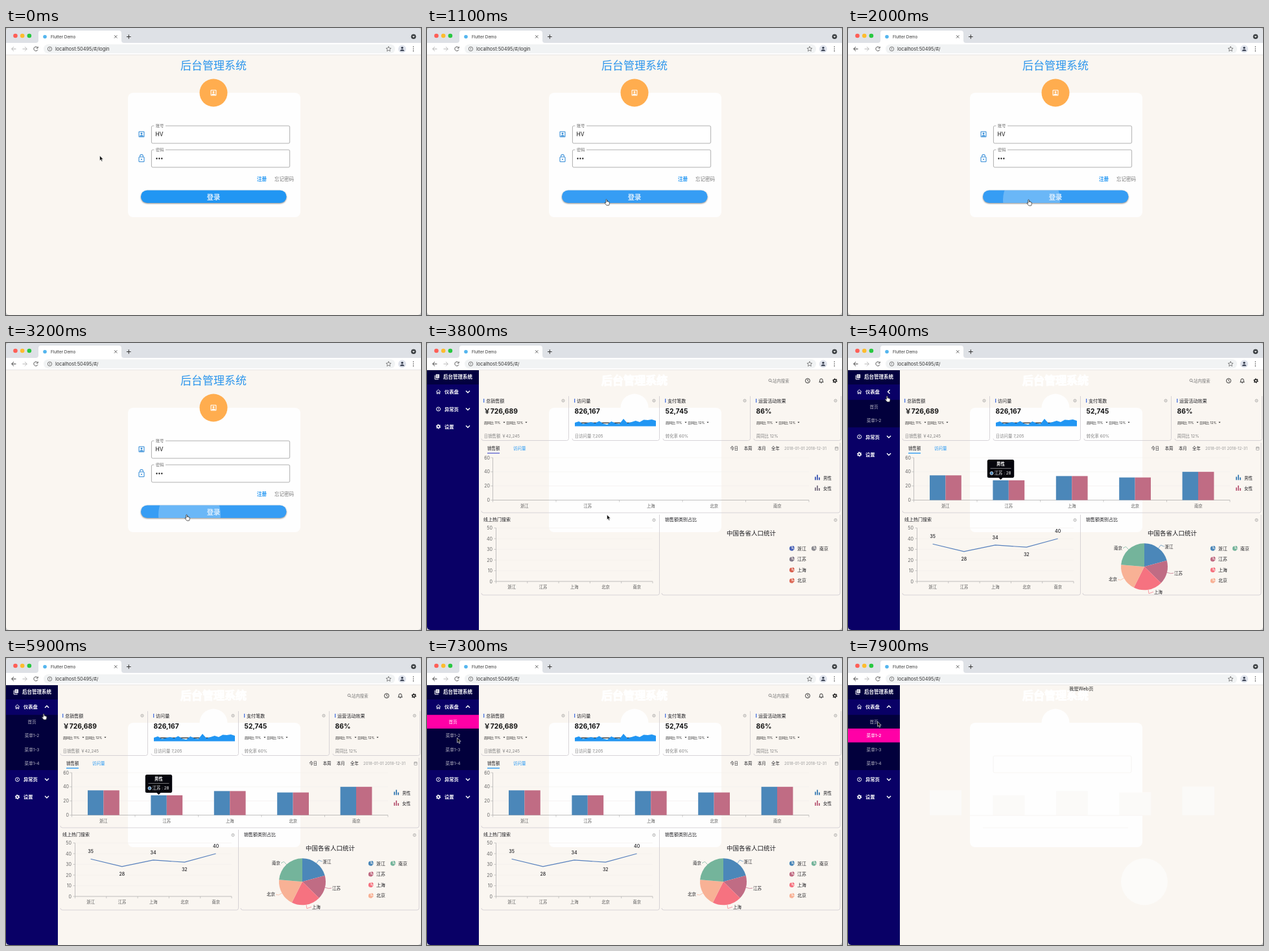
An HTML page for the animation above (8000 ms loop, 640x443 px).

```html
<!DOCTYPE html>
<html lang="zh-CN">
<head>
<meta charset="utf-8">
<title>后台管理系统</title>
<style>
html, body { margin: 0; width: 100%; height: 100%; overflow: hidden; background: #c8c8c8; }
svg { display: block; width: 640px; height: 443px; border-radius: 5px; font-family: Inter, "Noto Sans CJK SC", "Noto Sans CJK", sans-serif; }
text { white-space: pre; }
</style>
</head>
<body>
<svg id="stage" viewBox="0 0 640 443"></svg>
<script>
const BG = '#faf6f1', BLUE = '#2196f3', GRAY = '#808080', DARK = '#1c1c20';
const CITIES = ['浙江', '江苏', '上海', '北京', '南京'];
const VALUES = [35, 28, 34, 32, 40];
const COLORS = ['#4b87b9', '#c06c84', '#f67280', '#f8b195', '#74b49b'];
const EARLY = ['#4a63b8', '#857c8c', '#d9604f', '#dd6a58', '#8a8a90'];

// Drawing helpers
const rect = (x, y, w, h, fill, rx = 0, more = '') =>
  `<rect x="${x}" y="${y}" width="${w}" height="${h}" fill="${fill}" rx="${rx}" ${more}/>`;
const circle = (x, y, r, fill, more = '') => `<circle cx="${x}" cy="${y}" r="${r}" fill="${fill}" ${more}/>`;
const line = (d, color, w = .8, fill = 'none') =>
  `<path d="${d}" stroke="${color}" stroke-width="${w}" fill="${fill}"/>`;
const shape = (d, fill, more = '') => `<path d="${d}" fill="${fill}" ${more}/>`;
const text = (x, y, s, size, fill = DARK, weight = 400, anchor = 'start', more = '') =>
  `<text x="${x}" y="${y}" font-size="${size}" fill="${fill}" font-weight="${weight}" text-anchor="${anchor}" ${more}>${s}</text>`;
const at = (x, y, body, more = '') => `<g transform="translate(${x} ${y}) ${more}">${body}</g>`;
const clip = (id, area, body) => `<clipPath id="${id}">${area}</clipPath><g clip-path="url(#${id})">${body}</g>`;

const part = (t, from, to) => Math.min(1, Math.max(0, (t - from) / (to - from)));
const easeOut = p => 1 - (1 - p) ** 3;

// Icons, centred on 0,0
const info = (x, y, r = 2.1, c = '#888', w = .6) =>
  at(x, y, circle(0, 0, r, 'none', `stroke="${c}" stroke-width="${w}"`) + line(`M0 ${-r * .5}V${r * .15}M0 ${r * .4}v${r * .2}`, c, w));
const gear = (x, y, c, hole) => at(x, y,
  circle(0, 0, 2.7, c) + circle(0, 0, 3, 'none', `stroke="${c}" stroke-width="1.4" stroke-dasharray="1.57 1.57"`) + circle(0, 0, 1.2, hole));
const person = (x, y, c, back) => at(x, y,
  rect(-4.5, -4.5, 9, 9, c, 1) + rect(-3.4, -3.4, 6.8, 6.8, back) + circle(0, -1.1, 1.5, c) + shape('M-3 3.4C-3 .6 3 .6 3 3.4Z', c));
const chevron = (x, y, p = 0) => at(x, y, line('M-3-1.5L0 1.5 3-1.5', '#fff', 1.4), `rotate(${p * 180})`);
const bars = (x, y, c) => at(x, y, shape('M-4 4V-1h2V4ZM-1 4V-4h2V4ZM2 4V0h2V4Z', c));
const pieIcon = (x, y, c) => at(x, y, shape('M-.4-3.4A3.6 3.6 0 1 0 3 1L-.4.4ZM.6-4A3.6 3.6 0 0 1 3.8-.6L.6-.4ZM.8.2H3.8A3 3 0 0 1 3 2Z', c));

function browser(home) {
  return rect(0, 0, 640, 23, '#dee1e6')
    + ['#ff5f57', '#febc2e', '#28c840'].map((c, i) => circle(14.5 + 10.7 * i, 12, 3.3, c)).join('')
    + shape('M46 23q4 0 4-4V8q0-4 4-4H174q4 0 4 4V19q0 4 4 4Z', '#fff')
    + circle(60, 13.5, 2.8, '#54b5ee')
    + text(69, 16, 'Flutter Demo', 6.3, '#333')
    + line('M167 11.2l4.4 4.4m0-4.4l-4.4 4.4', '#555', .9)
    + line('M186 13.5h6.6M189.3 10.2v6.6', '#333', 1)
    + circle(628.5, 13.3, 3.8, '#3c4043') + shape('M626.5 12.4h4l-2 2.4Z', '#fff')
    + rect(0, 23, 640, 19, '#fff') + rect(58, 25.3, 542, 14, '#f1f3f4', 7)
    + line('M15.5 32.3H8.8M12 29l-3.3 3.3 3.3 3.3', home ? '#444' : '#b5b5b5', 1)
    + line('M25.5 32.3h6.7M29 29l3.3 3.3-3.3 3.3', '#b9b9b9', 1)
    + line('M48.6 30.2A3.2 3.2 0 1 0 49 33.4M49.2 28.7v2.4h-2.4', '#555', 1)
    + info(67.5, 32.3, 3.2, '#555', .8)
    + text(76, 35, 'localhost:50495/#/' + (home ? '' : 'login'), 7.4, '#333')
    + line('M590 28.4l1.1 2.6 2.8.2-2.1 1.9.6 2.7-2.4-1.5-2.4 1.5.6-2.7-2.1-1.9 2.8-.2Z', '#555', .7)
    + circle(611, 32.2, 6, '#dfe3ec') + circle(611, 30.6, 1.7, '#333b4d') + shape('M607.7 35.5C607.7 32 614.3 32 614.3 35.5Z', '#333b4d')
    + [29, 32.2, 35.4].map(y => circle(628.3, y, .8, '#444')).join('')
    + line('M0 41.5H640', '#e2e0de', .8);
}

function field(y, label) {
  return rect(224.4, y, 213.2, 27, '#fff', 2, 'stroke="#9c9c9c" stroke-width=".8"')
    + rect(228.5, y - 1, 17.5, 2, '#fff') + text(231, y + 2.4, label, 6.2, '#666');
}

function login(t) {
  const hover = t >= 600;
  const rip = part(t, 1600, 2000), grow = t >= 3200 ? 4 : 0;
  return text(320, 64, '后台管理系统', 17, '#2b95ec', 400, 'middle')
    + rect(188, 100, 266, 192, '#fefefe', 8)
    + circle(320, 100, 21.5, '#ffad4f') + person(320, 100, '#fff', '#ffad4f')
    + person(209, 164, '#3a8fd8', '#fff')
    + at(209, 201.5, rect(-4, -2.5, 8, 7.5, '#fff', 1, 'stroke="#3a8fd8" stroke-width="1.1"')
      + line('M-2.3-2.6V-4A2.3 2.3 0 0 1 2.3-4V-2.6', '#3a8fd8', 1.1) + circle(0, 1.2, 1, '#3a8fd8'))
    + field(151, '账号') + text(230.5, 167.2, 'HV', 8.4, '#111')
    + field(188, '密码') + [232.5, 236.4, 240.3].map(x => circle(x, 201.5, 1.15, '#111')).join('')
    + text(387, 236, '注册', 7.5, BLUE, 700) + text(414, 236, '忘记密码', 7.5, '#777', 500)
    + rect(208, 250.5, 224.5, 19.5, hover ? '#369df4' : BLUE, 9.75,
      `style="filter:drop-shadow(0 ${hover ? 1.4 : 1}px 1px #0007)"`)
    + (t >= 1700 ? clip('btn', rect(208, 250.5, 224.5, 19.5, '#000', 9.75),
      circle(278 + 5 * rip, 265, 44 * rip + grow, '#fff', 'opacity=".26"')) : '')
    + text(320, 264.8, '登录', 10.3, '#dceefe', 700, 'middle');
}

// Pale remains of the login panel
const loginTrace = () => text(320, 64, '后台管理系统', 17, '#fff', 400, 'middle', 'stroke="#fff" stroke-width="1.6"')
  + circle(320, 100, 21.5, '#fefefe') + rect(188, 100, 266, 192, '#fefefe', 8);

const cardEdge = (x, y, w, h) =>
  line(`M${x} ${y + h - 3}q0 3 3 3H${x + w - 3}q3 0 3-3V${y}`, '#cfcbd0', .8);

function statCard(i, title, value, foot) {
  const x = 87 + 140 * i;
  let s = cardEdge(x - 3, 82, 134.5, 68.5)
    + rect(x, 86, 1.3, 6, '#4a72dd') + text(x + 4, 91.8, title, 7.1, DARK, 500)
    + info(x + 123, 89) + text(x + .5, 109, value, 10.3, '#111', 700)
    + text(x + .8, 146, foot, 6.4, GRAY);
  if (i == 1) {
    const tops = [123, 121, 125, 123.5, 122, 124, 120.5, 124.5, 126, 121, 124, 125, 117, 124, 122, 120, 122, 118.5, 119, 118, 120];
    s += line('M237 123.3H347', '#222', 1.2)
      + shape(`M228 128.6L${tops.map((y, k) => 228 + 6.25 * k + ' ' + y).join('L')}V128.6Z`, BLUE);
  } else {
    s += [['周同比 11%', 1], ['日同比 12%', 35]].map(([label, dx]) =>
      text(x + dx, 124.6, label, 5, '#222') + shape(`M${x + dx + 29.5} 121.8h3l-1.5 1.7Z`, '#222')).join('');
  }
  return s;
}

function axes(x, right, zero, top, max, step, labelX, labelY) {
  const n = max / step, gap = (zero - top) / n, w = (right - x) / 5;
  let s = '';
  for (let k = 0; k <= n; k++) {
    const y = zero - gap * k;
    s += line(`M${x} ${y}H${right}`, k ? '#f1eeeb' : '#999', .6) + line(`M${x - 3} ${y}h3`, '#aaa', .6)
      + text(labelX, y + 2.5, k * step, 7.1, '#666', 400, 'end');
  }
  s += line(`M${x} ${top}V${zero}`, '#aaa', .7);
  CITIES.forEach((c, i) => {
    s += line(`M${x + w * i} ${zero}v3`, '#aaa', .6) + text(x + w * (i + .5), labelY, c, 6.3, '#555', 400, 'middle');
  });
  return s + line(`M${right} ${zero}v3`, '#aaa', .6);
}

const barX = i => 126 + 97.4 * i;
const barH = v => v * 65.5 / 60;

function tooltip(scale) {
  return at(235.5, 211, rect(-20.7, -31, 41.4, 28, '#05050c', 2.5) + shape('M-3.5-3.4H3.5L0 0Z', '#05050c')
    + text(0, -22, '男性', 6.4, '#fff', 700, 'middle') + line('M-16-17.5H16', '#bbb', .6)
    + circle(-14, -10, 2.5, COLORS[0], 'stroke="#fff" stroke-width=".7"')
    + text(-9.7, -7.6, '江苏 : 28', 6.3, '#fff'), `scale(${scale})`);
}

function barChart(t, p, pal) {
  let s = cardEdge(84, 154, 553, 108)
    + text(93, 164.6, '销售额', 6.5) + rect(93, 169.4, 19, 1.3, pal === EARLY ? '#5a62d0' : BLUE)
    + text(133, 164.6, '访问量', 6.5, BLUE)
    + ['今日', '本周', '本月', '全年'].map((l, i) => text(467.5 + 21.2 * i, 164.8, l, 6.3, DARK, 500)).join('')
    + text(551, 164.8, '2018-01-01 2018-12-31', 6.05, '#999')
    + rect(629.5, 160.5, 4.4, 4.8, 'none', .5, 'stroke="#888" stroke-width=".6"') + line('M629.5 162h4.4', '#888', .8)
    + axes(101.5, 589, 242.5, 177, 60, 20, 97, 254);
  VALUES.forEach((v, i) => [0, 1].forEach(k => {
    s += rect(barX(i) + 24.4 * k, 242.5 - barH(v) * p, 24.4, barH(v) * p, COLORS[k]);
  }));
  s += ['男性', '女性'].map((l, k) => bars(602, 207.5 + 16.5 * k, pal[k]) + text(611, 210.5 + 16.5 * k, l, 6.6)).join('');
  return s + (t >= 4500 && t < 7100 ? tooltip(t < 4600 ? .6 : t < 4900 ? 1.08 : 1) : '');
}

function lineChart(p) {
  const px = i => 130.6 + 48.25 * i, py = v => 368 - v * 1.65;
  const d = 'M' + VALUES.map((v, i) => px(i) + ' ' + py(v)).join('L');
  return cardEdge(84, 265, 274.5, 124) + text(87, 275, '线上热门搜索', 7, DARK, 500) + info(350, 273.3)
    + axes(106.5, 348, 368, 285.5, 50, 10, 101, 379)
    + clip('reveal', rect(106, 280, 242 * p, 90, '#000'), line(d, '#5780bd', 1.2))
    + (p < 1 ? '' : VALUES.map((v, i) => text(px(i), py(v) + (i % 2 ? 14 : -9), v, 7, DARK, 500, 'middle')).join(''));
}

function pieChart(p, pal) {
  const cx = 457, cy = 345.3, r = 36, total = VALUES.reduce((a, b) => a + b);
  const spot = (a, q) => `${cx + q * Math.sin(a)} ${cy - q * Math.cos(a)}`;
  const labelAt = [[488.5, 316.5], [503, 357.5], [472, 386.5], [402, 367.3], [410, 319]];
  let s = cardEdge(362, 265, 275, 124) + text(367, 275, '销售额类别占比', 7, DARK, 500) + info(630, 273.3)
    + text(500, 297, '中国各省人口统计', 9.5, DARK, 400, 'middle');
  let sum = 0;
  VALUES.forEach((v, i) => {
    const a = sum / total * 2 * Math.PI * p, b = (sum += v) / total * 2 * Math.PI * p;
    if (p > 0) s += shape(`M${cx} ${cy}L${spot(a, r)}A${r} ${r} 0 0 1 ${spot(b, r)}Z`, COLORS[i]);
    if (p == 1) {
      const [x, y] = labelAt[i], left = i > 2;
      s += line(`M${spot((a + b) / 2, r)}L${spot((a + b) / 2, r + 6)}L${left ? x + 14 : x - 1} ${y - 2.3}`, COLORS[i], .7)
        + text(x, y, CITIES[i], 6.5);
    }
    const x = i == 4 ? 597 : 563, y = i == 4 ? 317 : 317 + 16.6 * i;
    s += pieIcon(x, y, pal[i]) + text(x + 8, y + 2.6, CITIES[i], 6.9);
  });
  return s;
}

function dashboard(t) {
  const p = easeOut(part(t, 3900, 4700)), pal = t < 4000 ? EARLY : COLORS;
  return loginTrace()
    + circle(529, 57.6, 2, 'none', 'stroke="#777" stroke-width=".8"') + line('M530.4 59l2 2', '#777', .9)
    + text(533, 60.6, '站内搜索', 6.4, '#777')
    + circle(587, 58.3, 3.5, 'none', 'stroke="#222" stroke-width=".9"') + line('M587 56v2.5l1.7 1', '#222', .8)
    + line('M604.8 60.3h6.4l-1-1.2V57.4q0-2.2-2.2-2.2t-2.2 2.2v1.7ZM607.2 61.7h1.6', '#222', .9)
    + gear(629, 58.3, '#222', BG)
    + statCard(0, '总销售额', '￥726,689', '日销售额 ￥42,245') + statCard(1, '访问量', '826,167', '日访问量 7,205')
    + statCard(2, '支付笔数', '52,745', '转化率 60%') + statCard(3, '运营活动效果', '86%', '周同比 12%')
    + barChart(t, p, pal) + lineChart(p) + pieChart(p, pal);
}

function webPage() {
  const pale = '#fcfbf9';
  return circle(457, 345.3, 36, pale) + VALUES.map((v, i) => rect(barX(i), 242.5 - barH(v), 49, barH(v), pale)).join('')
    + loginTrace()
    + VALUES.map((v, i) => rect(barX(i), 242.5 - barH(v), 49, barH(v), '#fbfaf8')).join('')
    + rect(224, 151, 213, 26, 'none', 2, 'stroke="#f4f2ef" stroke-width=".8"')
    + line('M188 243H454M208 262H432', '#f4f2ef', .8)
    + text(341, 49.8, '我是Web页', 7.3, '#222');
}

function sidebar(t) {
  const open = part(t, 5200, 5600), drop = 85.5 * open;
  const chosen = t >= 7500 ? 1 : t >= 6700 ? 0 : -1;
  let items = rect(0, 87.5, 80, 85.5, '#02003c');
  ['首页', '菜单1-2', '菜单1-3', '菜单1-4'].forEach((label, i) => {
    const on = i == chosen, y = 87.5 + 21.4 * i;
    if (on) items += rect(0, y, 80, 21.4, '#ff00a6');
    items += text(40, y + 13.2, label, 6.6, on ? '#fff' : '#b4b2c2', on ? 500 : 400, 'middle');
  });
  const row = (y, label, icon, p) => at(0, y, icon + text(27, 2.8, label, 7.3, '#fff', 700) + chevron(63, 0, p));
  return rect(0, 42, 80, 401, '#090066') + rect(0, 42, 80, 22, '#02003f')
    + line('M12.2 50v6h5.6', '#fff', 1) + rect(13.6, 48.2, 5.4, 6, '#fff', .6) + line('M14.8 50h3M14.8 52h3', '#02003f', .6)
    + text(25, 55.3, '后台管理系统', 7.5, '#fff', 700)
    + row(75.3, '仪表盘', line('M14.2-.2L17.5-3.2l3.3 3M15.2-.6V3h1.5V.8h1.6V3h1.5V-.6', '#fff', .9), open)
    + clip('menu', rect(0, 87.5, 80, drop, '#000'), items)
    + row(102 + drop, '异常页', info(17.5, 0, 3, '#fff', 1)) + row(129 + drop, '设置', gear(17.5, 0, '#fff', '#090066'));
}

// Pointer path: time, x, y
const PATH = [[0, 144.5, 197], [100, 144.5, 197], [400, 222, 236], [500, 222, 236], [700, 270, 263], [800, 270, 263],
  [1200, 277.5, 265], [3900, 277.5, 265], [4200, 248, 235], [4400, 236, 222], [4600, 232, 212], [4800, 214.5, 172],
  [5200, 60, 80], [5900, 57, 86], [6400, 42, 97], [6700, 42, 98], [7300, 46.5, 123], [7600, 47, 121], [7700, 47, 121], [7900, 45.5, 98]];

function pointer(t) {
  let k = PATH.findIndex(q => q[0] > t);
  if (k < 0) k = PATH.length - 1;
  const [t0, x0, y0] = PATH[k - 1], [t1, x1, y1] = PATH[k], p = part(t, t0, t1);
  const hand = t >= 600 && t < 3800 || t >= 5200 && t < 6700;
  return at(x0 + (x1 - x0) * p, y0 + (y1 - y0) * p, hand
    ? line('M.2 1Q.2 0 1 0T1.8 1V3.6Q3-.1+3.2 3.7Q4.3 3 4.5 4.1Q5.8 3.6 5.8 5V6.6L5 9.2H1.3L-1.6 5.7Q-1.6 4.6-.6 4.9L.2 5.7Z', '#222', .7, '#fff')
    : line('M0 0V7.8L1.8 6.2 3 9 4.4 8.4 3.2 5.7H5.6Z', '#fff', .6, '#111'));
}

const stage = document.getElementById('stage');
let last = -1;

function draw(now) {
  const t = Math.floor(now % 8000 / 100) * 100;
  if (t != last) {
    last = t;
    const page = t < 3800 ? login(t) : (t < 7500 ? dashboard(t) : webPage()) + sidebar(t);
    stage.innerHTML = rect(0, 0, 640, 443, BG) + browser(t >= 1900) + page + pointer(t);
  }
}

const start = performance.now();
(function loop() {
  draw(performance.now() - start);
  requestAnimationFrame(loop);
})();
</script>
</body>
</html>
```
